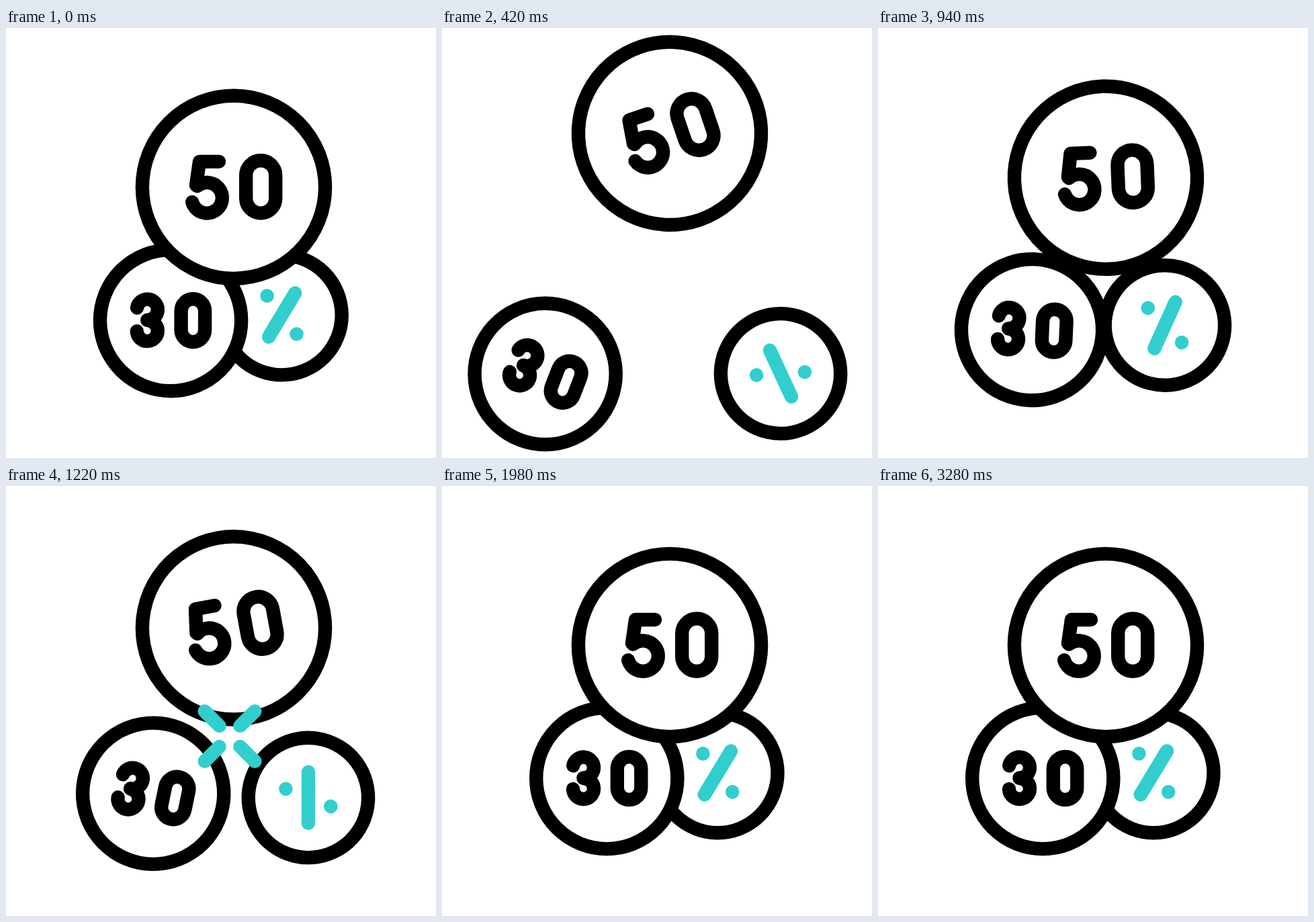
Recreate the animation shown at these times as an HTML page with a canvas. Size 640x640 px, loop 3.3 s.

```html
<!DOCTYPE html>
<html lang="en">
<head>
<meta charset="utf-8">
<title>Bouncing discount balls</title>
<style>
  html, body { margin: 0; width: 100%; height: 100%; overflow: hidden; background: #fff; }
  canvas { display: block; width: 100vmin; height: 100vmin; }
</style>
</head>
<body>
<canvas id="stage" width="640" height="640"></canvas>
<script>
const ctx = document.getElementById('stage').getContext('2d');
const LOOP = 3300;
const LINE = 20.4;
const BLACK = '#000';
const TEAL = '#32cece';
const rad = deg => deg * Math.PI / 180;

// Phases: fly out, hold, fall back, bounce, settle.
const T = { out: 450, hold: 600, hit: 985, peak: 1440, rest: 1980 };

// rest: home centre, out: farthest centre, bounce: share of that travel, spin: degrees
const balls = [
  { rest: [410.3, 427], out: [510.5, 520.4], r: 89.2, bounce: 0.555, spin: -60, face: drawPercent },
  { rest: [245.3, 435], out: [147.3, 520.4], r: 105.1, bounce: 0.374, spin: 22.5, face: drawThirty },
  { rest: [339, 237], out: [339, 151.4], r: 136.1, bounce: 0.42, spin: -20, face: drawFifty }
];

const span = (t, from, to) => Math.min(1, Math.max(0, (t - from) / (to - from)));
const mix = (a, b, k) => a + (b - a) * k;
// Quadratic acceleration with the given starting speed.
const accelerate = (x, speed) => x * (speed + (1 - speed) * x);

function pose(t, bounce) {
  if (t < T.hold) {
    const k = span(t, 0, T.out);
    return { travel: k, turn: k };
  }
  if (t < T.hit) {
    const k = span(t, T.hold, T.hit);
    return { travel: 1 - accelerate(k, 0.49), turn: 1 - k };
  }
  if (t < T.peak) {
    const k = span(t, T.hit, T.peak);
    return { travel: bounce * (1 - accelerate(1 - k, 0.224)), turn: k };
  }
  const k = 1 - span(t, T.peak, T.rest);
  return { travel: bounce * k, turn: k };
}

function stroke(color, build) {
  ctx.strokeStyle = color;
  ctx.beginPath();
  build();
  ctx.stroke();
}

function dot(x, y) {
  ctx.fillStyle = TEAL;
  ctx.beginPath();
  ctx.arc(x, y, 10.3, 0, 2 * Math.PI);
  ctx.fill();
}

function zero(x, y, w, h) {
  stroke(BLACK, () => ctx.roundRect(x, y, w, h, w / 2));
}

function drawFifty() {
  stroke(BLACK, () => {
    ctx.moveTo(-22, -38);
    ctx.lineTo(-51, -38);
    ctx.lineTo(-56, -3);
    ctx.arc(-40, 16, 22.8, rad(-130), rad(164));
  });
  zero(18.2, -39.6, 44, 78.4);
}

function drawThirty() {
  stroke(BLACK, () => {
    ctx.arc(-34.8, -16, 15.5, rad(-170), rad(90));
    ctx.arc(-34.8, 15.5, 15.5, rad(-90), rad(178));
  });
  zero(15.5, -32, 35.5, 64);
}

function drawPercent() {
  stroke(TEAL, () => {
    ctx.moveTo(-19.6, 32.4);
    ctx.lineTo(19.8, -32.6);
  });
  dot(-21.9, -28.6);
  dot(21.9, 28.4);
}

function drawBall(ball, t) {
  const { travel, turn } = pose(t, ball.bounce);
  ctx.save();
  ctx.translate(mix(ball.rest[0], ball.out[0], travel), mix(ball.rest[1], ball.out[1], travel));
  ctx.rotate(rad(ball.spin * turn));
  ctx.fillStyle = '#fff';
  stroke(BLACK, () => {
    ctx.arc(0, 0, ball.r, 0, 2 * Math.PI);
    ctx.fill();
  });
  ball.face();
  ctx.restore();
}

function drawBurst(t) {
  if (t <= T.hit || t >= T.peak) return;
  const head = mix(15.3, 37.3, span(t, T.hit, 1200));
  const tail = mix(15.3, 37.3, span(t, 1220, T.peak));
  for (const sx of [-1, 1]) {
    for (const sy of [-1, 1]) {
      stroke(TEAL, () => {
        ctx.moveTo(333 + sx * tail, 372.5 + sy * tail);
        ctx.lineTo(333 + sx * head, 372.5 + sy * head);
      });
    }
  }
}

function draw(t) {
  ctx.fillStyle = '#fff';
  ctx.fillRect(0, 0, 640, 640);
  ctx.lineWidth = LINE;
  ctx.lineCap = ctx.lineJoin = 'round';
  balls.forEach(ball => drawBall(ball, t));
  drawBurst(t);
}

const start = performance.now();
function tick() {
  draw((performance.now() - start) % LOOP);
  requestAnimationFrame(tick);
}
tick();
</script>
</body>
</html>
```
